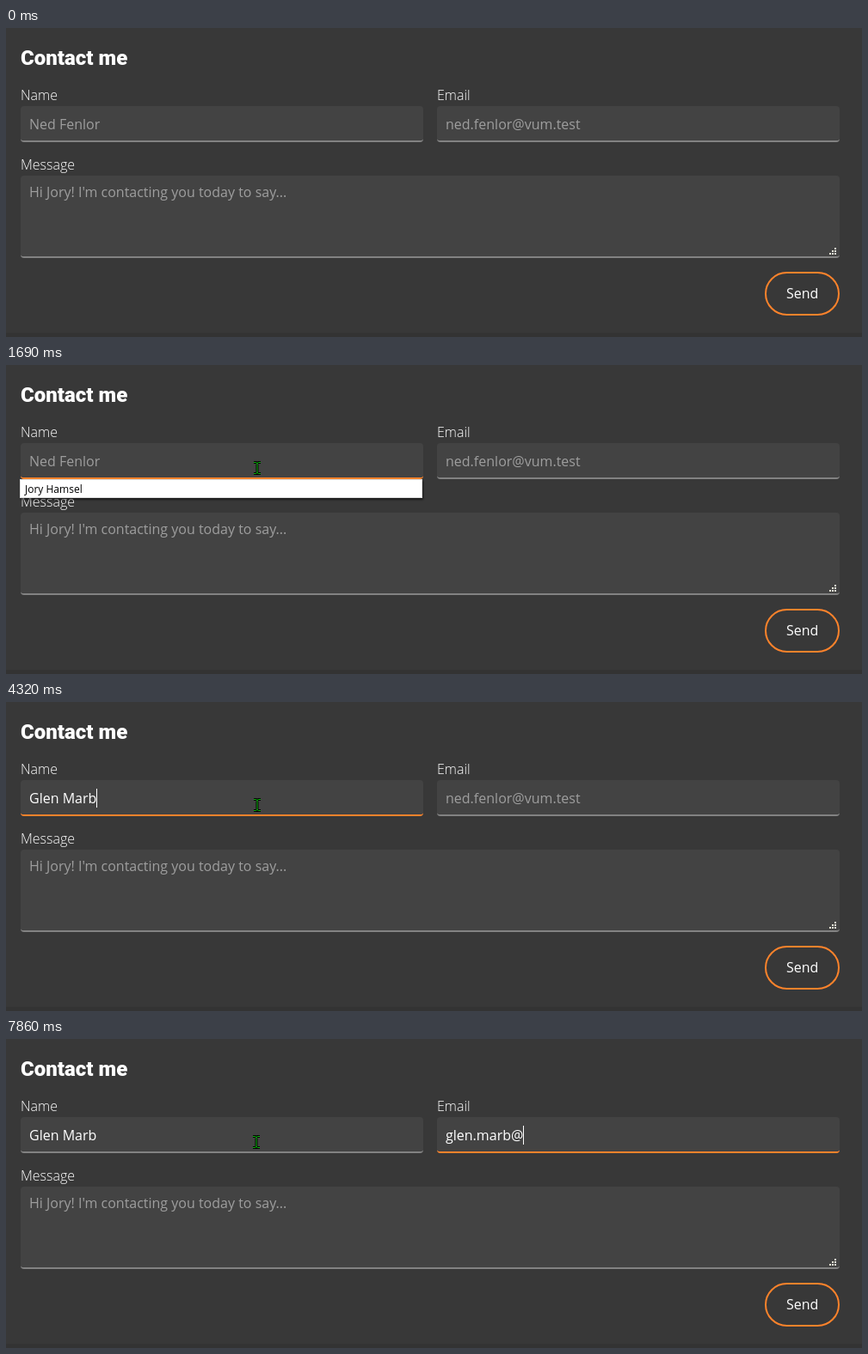
An HTML page that plays this animation: 995x360 px, repeating every 8000 ms.

```html
<!DOCTYPE html>
<html lang="en">
<head>
<meta charset="utf-8">
<title>Contact form</title>
<style>
  :root { --orange: #fd832b; --line: #828282; }
  html, body { margin: 0; width: 100%; height: 100%; overflow: hidden; background: #383838; }
  #stage { position: absolute; left: 0; top: 0; width: 995px; height: 360px; overflow: hidden; background: #383838; }
  #stage > * { position: absolute; box-sizing: border-box; }
  .field { background: #434343; border-bottom: 2px solid var(--line); border-radius: 4px; height: 42px; width: 468px; top: 91px; }
  #name { left: 17px; }
  #email { left: 501px; }
  #message { left: 17px; top: 172px; width: 952px; height: 96px; }
  #send { left: 882px; top: 284px; width: 87px; height: 51px; border: 2px solid var(--orange); border-radius: 26px; }
  #footer { left: 0; top: 355px; width: 100%; height: 5px; background: #333; }
  svg { left: 0; top: 0; }
  text { font: 16px "Open Sans", sans-serif; fill: #fff; white-space: pre; }
  text.title { font: 900 24px Roboto, sans-serif; }
  text.label { font-weight: 300; }
  text.hint { fill: #9e9e9e; }
  #suggest { filter: drop-shadow(1px 2px 1px rgba(0, 0, 0, .55)); }
  #suggest text { font-size: 12px; fill: #000; }
  #pointer path { fill: none; stroke: #000; stroke-width: 3; }
  #pointer path + path { stroke: #0fb80f; stroke-width: 1; }
</style>
</head>
<body>
<div id="stage">
  <div class="field" id="name"></div>
  <div class="field" id="email"></div>
  <div class="field" id="message"></div>
  <div id="send"></div>
  <div id="footer"></div>
  <svg width="995" height="360">
    <text class="title" x="17" y="43">Contact me</text>
    <text class="label" x="17" y="84">Name</text>
    <text class="label" x="501" y="84">Email</text>
    <text class="label" x="17" y="165">Message</text>
    <text id="nameText" x="27" y="118"></text>
    <text id="emailText" x="511" y="118"></text>
    <text class="hint" x="27" y="197">Hi Jory! I'm contacting you today to say...</text>
    <text x="907" y="315">Send</text>
    <g id="grip" fill="#ece9d8"></g>
    <rect id="caret" y="101" width="1" height="22" fill="#fff"/>
    <g id="suggest">
      <rect x="16.5" y="133.5" width="467" height="21" fill="#fff" stroke="#ddd"/>
      <text x="22" y="149">Jory Hamsel</text>
    </g>
    <circle id="press" cx="291" cy="119" r="12" fill="#9c9c1c"/>
    <g id="pointer">
      <path d="M-4-6.5H-1.5L0-5.5L1.5-6.5H4M-4 6.5H-1.5L0 5.5L1.5 6.5H4M0-6V6"/>
      <path d="M-4-6.5H-1.5L0-5.5L1.5-6.5H4M-4 6.5H-1.5L0 5.5L1.5 6.5H4M0-6V6"/>
    </g>
  </svg>
</div>
<script>
const LOOP = 8000;
const FOCUS_NAME = 1150, FOCUS_EMAIL = 4320;
const $ = id => document.getElementById(id);

// Each key time types one more character of the value.
const fields = {
  name: {
    x: 27, hint: 'Ned Fenlor', value: 'Glen Marb',
    keys: [1920, 2220, 2380, 2690, 2840, 3220, 3450, 3620, 3770]
  },
  email: {
    x: 511, hint: 'ned.fenlor@vum.test', value: 'glen.marb@',
    keys: [5320, 5400, 5550, 5780, 6320, 6550, 6780, 6930, 7090, 7860]
  }
};
const caretOff = [[1690, 1920], [4940, 5320], [6010, 6320], [7550, 7860]];

const ctx = document.createElement('canvas').getContext('2d');
function textWidth(s) {
  ctx.font = '16px "Open Sans", sans-serif';
  return ctx.measureText(s).width;
}

const within = (t, from, to) => t >= from && t < to;
const show = (id, on) => $(id).setAttribute('visibility', on ? 'visible' : 'hidden');
const typed = (f, t) => f.value.slice(0, f.keys.filter(k => k <= t).length);
const fade = (t, start) => t < start + 80 ? 0 : t < start + 150 ? 0.55 : 1;

function drawField(id, t, focus) {
  const f = fields[id], s = typed(f, t), label = $(id + 'Text');
  label.textContent = s || f.hint;
  label.setAttribute('class', s ? '' : 'hint');
  $(id).style.borderBottomColor = `color-mix(in srgb, var(--orange) ${focus * 100}%, var(--line))`;
}

function drawCaret(t) {
  const f = t < FOCUS_EMAIL + 80 ? fields.name : fields.email;
  $('caret').setAttribute('x', Math.floor(f.x + textWidth(typed(f, t))));
  show('caret', t >= FOCUS_NAME && !caretOff.some(([a, b]) => within(t, a, b)));
}

// The pointer jumps in, then glides to the name field in seven steps.
function pointerAt(t) {
  if (t < 370) return [537, 239];
  if (t < 520) return [480, 205];
  if (t >= 5480) return [291, 120];
  const step = Math.min(7, 1 + Math.floor((t - 520) / 76.6));
  const p = 1 - (1 - step / 7) ** 2;
  return [Math.round(480 - 188 * p), Math.round(205 - 85 * p)];
}

function draw(t) {
  const emailFocus = fade(t, FOCUS_EMAIL);
  drawField('name', t, fade(t, FOCUS_NAME) - emailFocus);
  drawField('email', t, emailFocus);
  drawCaret(t);
  show('suggest', within(t, 1300, 1920));
  show('press', within(t, FOCUS_NAME, 1300));
  show('pointer', t >= 290);
  $('pointer').setAttribute('transform', `translate(${pointerAt(t)})`);
}

for (let row = 0; row < 3; row++) {
  for (let col = 2 - row; col < 3; col++) {
    const dot = document.createElementNS($('grip').namespaceURI, 'rect');
    const box = { x: 957 + 3 * col, y: 256 + 3 * row, width: 2, height: 2 };
    for (const key in box) dot.setAttribute(key, box[key]);
    $('grip').append(dot);
  }
}

const start = performance.now();
function tick() {
  draw((performance.now() - start) % LOOP);
  requestAnimationFrame(tick);
}
tick();
</script>
</body>
</html>
```
